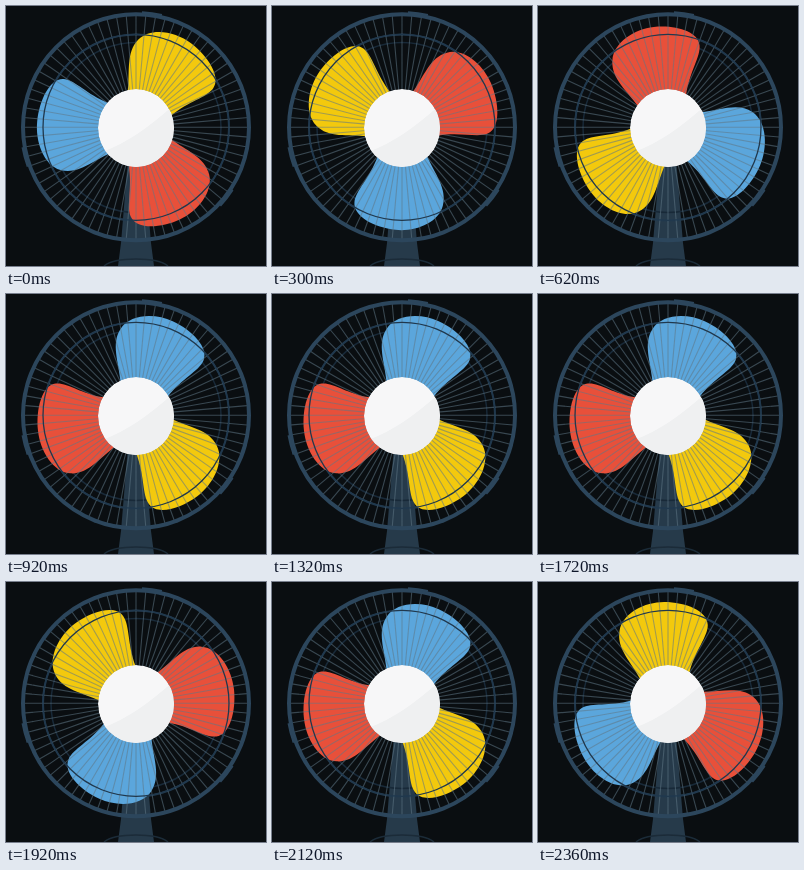
These frames come from a looping animation (260x260 px, 2380 ms). An HTML page:

```html
<!DOCTYPE html>
<html lang="en">
<head>
<meta charset="utf-8">
<title>Fan</title>
<style>
  html, body { margin: 0; width: 100%; height: 100%; overflow: hidden; background: #0a0e11; }
  svg { display: block; width: 100vw; height: 100vh; }
</style>
</head>
<body>
<svg viewBox="0 0 260 260">
  <defs>
    <path id="blade" d="M-28 -24C-38 -42 -53 -55 -50 -73C-47 -91 -24 -102 -4 -102C18 -102 41 -93 41 -79C41 -67 28 -54 22 -31L0 0Z"/>
    <clipPath id="hub"><ellipse rx="38" ry="39"/></clipPath>
  </defs>
  <g transform="translate(130 122)" fill="none">
    <path fill="#263a4a" d="M-8 30H8L15 115L18 138H-18L-15 115Z"/>
    <path stroke="#1b2b38" stroke-width="1.5" d="M-32 138C-26 133 -14 131 0 131S26 133 32 138"/>
    <circle r="85" cy="-.5" stroke="#182938" stroke-width="1.5"/>
    <circle r="93" cy="-.5" stroke="#223a4e" stroke-width="2"/>
    <g transform="scale(.97 1)">
      <g id="blades">
        <use href="#blade" fill="#f3c90d"/>
        <use href="#blade" fill="#e8503a"/>
        <use href="#blade" fill="#5ba6dc"/>
      </g>
    </g>
    <g transform="translate(0 -.7)">
      <path id="spokes" stroke="#607786" stroke-width="1.1" opacity=".55"/>
      <circle r="93" stroke="#20384d" stroke-width="1.3"/>
      <circle r="113" stroke="#2c465c" stroke-width="4"/>
      <path id="clips" stroke="#2c465c" stroke-width="2.5"/>
    </g>
    <g clip-path="url(#hub)">
      <ellipse rx="38" ry="39" fill="#f7f7f8"/>
      <path fill="#eff0f1" d="M-34 24C-8 14 12 0 39 -24V40H-34Z"/>
    </g>
  </g>
</svg>
<script>
  const FRAME = 20, LOOP = 2380, SPOKES = 72;
  const byId = id => document.getElementById(id);
  const polar = (r, deg) => {
    const a = deg * Math.PI / 180;
    return `${(r * Math.cos(a)).toFixed(2)} ${(r * Math.sin(a)).toFixed(2)}`;
  };

  byId('spokes').setAttribute('d', Array.from({ length: SPOKES }, (_, i) => {
    const deg = i * 360 / SPOKES;
    return `M${polar(36, deg)}L${polar(113, deg)}`;
  }).join(''));

  byId('clips').setAttribute('d', [-87, 33, 160].map(deg =>
    `M${polar(115, deg)}A115 115 0 0 1 ${polar(115, deg + 10)}`).join(''));

  [...byId('blades').children].forEach((blade, i) =>
    blade.setAttribute('transform', `rotate(${i * 120})`));

  // One turn every 20 steps
  function draw() {
    const step = Math.floor(performance.now() % LOOP / FRAME);
    byId('blades').setAttribute('transform', `rotate(${36 + 18 * step})`);
    requestAnimationFrame(draw);
  }
  draw();
</script>
</body>
</html>
```
